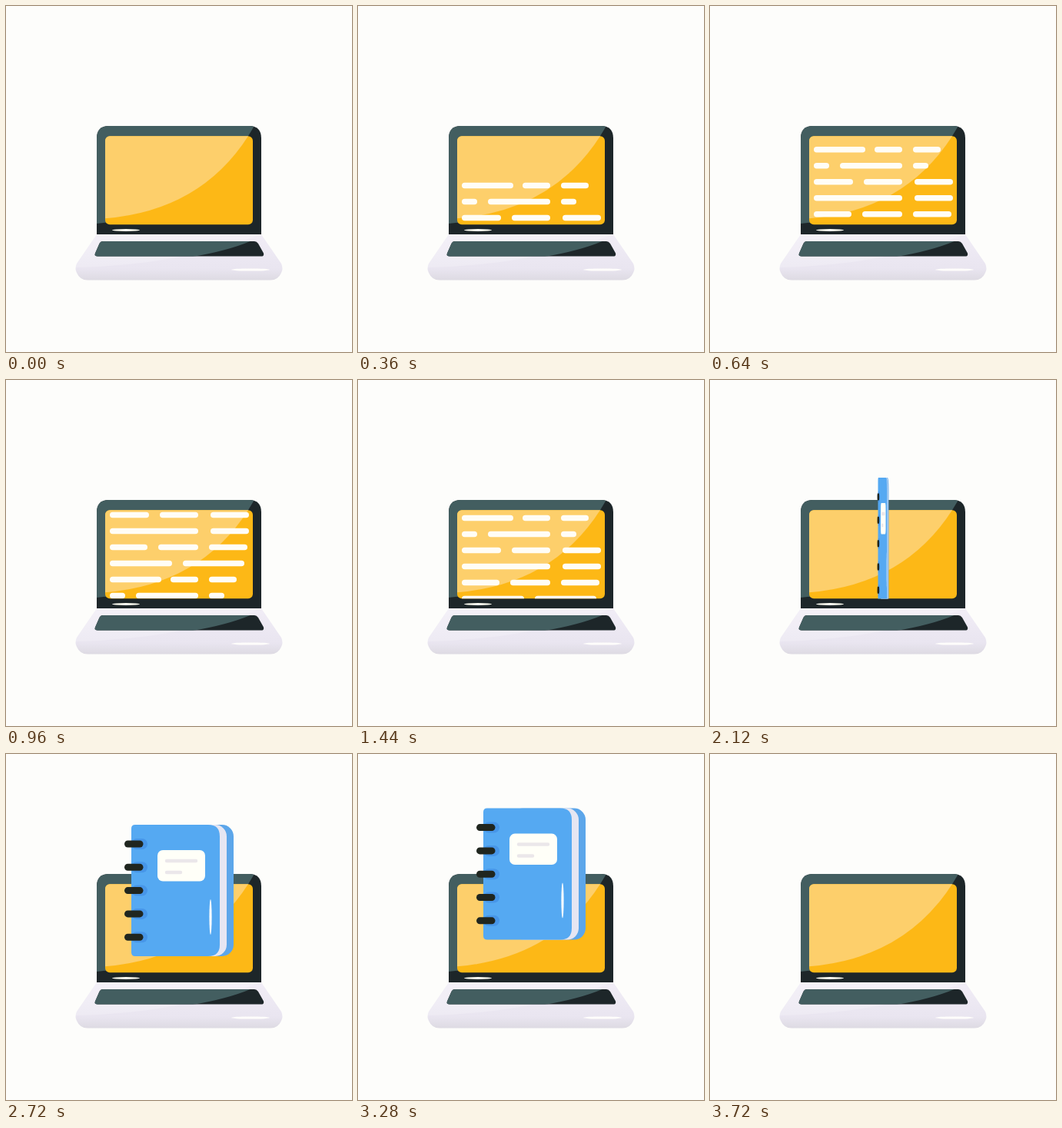
These frames come from a looping animation (450 by 450 pixels, 3.84 s). An HTML page:

```html
<!DOCTYPE html>
<html lang="en">
<head>
<meta charset="utf-8">
<title>Laptop and notebook</title>
<style>
  html, body { margin: 0; width: 100%; height: 100%; overflow: hidden; background: #fdfdfb; }
  svg { display: block; width: 100vw; height: 100vh; }
</style>
</head>
<body>
<svg viewBox="0 0 450 450">
  <defs>
    <clipPath id="screenClip"><rect x="129" y="169.200" width="192" height="115" rx="6"/></clipPath>
    <clipPath id="bezelClip"><path d="M118 297V172Q118 156 134 156H316Q332 156 332 172V297Z"/></clipPath>
    <clipPath id="keysClip"><path d="M126 306H323Q326 306 328 309L335 321.500Q336 325.500 332 325.500H119Q114.500 325.500 116 321.500L121.500 309Q123 306 126 306Z"/></clipPath>
    <clipPath id="baseClip"><path d="M118 297H332L358 335Q361 342 358 347Q354 356.500 344 356.500H106Q96 356.500 92 347Q89 342 92 335Z"/></clipPath>
    <clipPath id="slotClip"><rect width="450" height="284.500"/></clipPath>
    <linearGradient id="baseFill" x2="0" y2="1">
      <stop stop-color="#f1edf6"/><stop offset=".75" stop-color="#e9e5f0"/><stop offset="1" stop-color="#dddae2"/>
    </linearGradient>
  </defs>

  <g clip-path="url(#bezelClip)">
    <rect x="118" y="155" width="214" height="142" fill="#1d2629"/>
    <path d="M118 155H323.500Q259 270 118 283Z" fill="#435e60"/>
  </g>
  <g clip-path="url(#screenClip)">
    <rect x="129" y="169" width="192" height="116" fill="#fdb816"/>
    <path d="M118 155H323.500Q259 270 118 277Z" fill="#fdcf6b"/>
    <g id="lines" stroke="#fffdf6" stroke-width="7.500" stroke-linecap="round"/>
  </g>
  <ellipse cx="156" cy="291.500" rx="18" ry="1.500" fill="#fffff4"/>

  <g clip-path="url(#baseClip)">
    <rect x="88" y="297" width="274" height="60" fill="url(#baseFill)"/>
    <path d="M88 297H332Q220 338 88 340Z" fill="#fff" opacity=".2"/>
  </g>
  <g clip-path="url(#keysClip)">
    <rect x="112" y="305" width="226" height="21" fill="#1d2629"/>
    <path d="M112 305H320Q290 318 243 326H112Z" fill="#435e60"/>
  </g>
  <ellipse cx="318" cy="343" rx="25" ry="1.600" fill="#fffdfb"/>

  <g clip-path="url(#slotClip)">
    <g id="book">
      <rect x="200" y="92" width="96" height="171" rx="15" fill="#5ca6ea"/>
      <rect x="200" y="92" width="87" height="171" rx="15" fill="#e6e6f2"/>
      <path d="M168 92H263Q278 92 278 107V248Q278 263 263 263H168Q163 263 163 258V97Q163 92 168 92Z" fill="#55a9f2"/>
      <g id="rings" stroke-linecap="round"/>
      <rect x="197" y="125" width="62" height="40.500" rx="7" fill="#fffff8"/>
      <path d="M209 139H247M209 154H227" stroke="#ebe7ea" stroke-width="4.500" stroke-linecap="round"/>
      <ellipse cx="266" cy="212" rx="1.600" ry="23" fill="#fafdff"/>
    </g>
  </g>
</svg>
<script>
const LOOP = 3840, LINES_END = 2000, RISE = 1868, TOP = 2720, SUNK = 3700;
const TRAVEL = 193, ROW = 21;
const rows = [
  [135, 202, 214, 250, 264, 300],
  [135, 155, 169, 250, 264, 284],
  [135, 186, 200, 250, 266, 316],
  [135, 250, 266, 316],
  [135, 184, 198, 250, 264, 314],
  [135, 216, 230, 310]
];
const $ = id => document.getElementById(id);
const lines = $('lines'), book = $('book');

let d = '';
for (let i = 0; i < rows.length * 2; i++) {
  const row = rows[i % rows.length];
  for (let k = 0; k < row.length; k += 2)
    d += `M${row[k] + 3.75} ${i * ROW}H${row[k + 1] - 3.75}`;
}
lines.innerHTML = `<path d="${d}"/>`;

for (let i = 0; i < 5; i++) {
  const y = 117 + i * 30.3;
  $('rings').innerHTML += `<path d="M170 ${y}H177" stroke="#4796e8" stroke-width="14"/>
    <path d="M158.500 ${y}H174" stroke="#20261f" stroke-width="9"/>`;
}

const inOutCubic = p => p < .5 ? 4 * p ** 3 : 1 - 4 * (1 - p) ** 3;
const backIn = (p, c) => (c + 1) * p ** 3 - c * p * p;

function draw(t) {
  lines.style.display = t < LINES_END ? '' : 'none';
  lines.setAttribute('transform', `translate(0 ${293.7 - t / 6})`);

  const visible = t > RISE && t < SUNK;
  book.style.display = visible ? '' : 'none';
  if (!visible) return;
  const rising = t < TOP;
  const p = rising ? (t - RISE) / (TOP - RISE) : (t - TOP) / (SUNK - TOP);
  const y = TRAVEL * (rising ? backIn(1 - p, 1.13) : backIn(p, 2.13));
  const turn = rising ? inOutCubic(p) : 1;
  book.setAttribute('transform', `translate(225 ${y}) scale(${turn} 1) translate(-225 0)`);
}

function tick() {
  draw(performance.now() % LOOP);
  requestAnimationFrame(tick);
}
tick();
</script>
</body>
</html>
```
